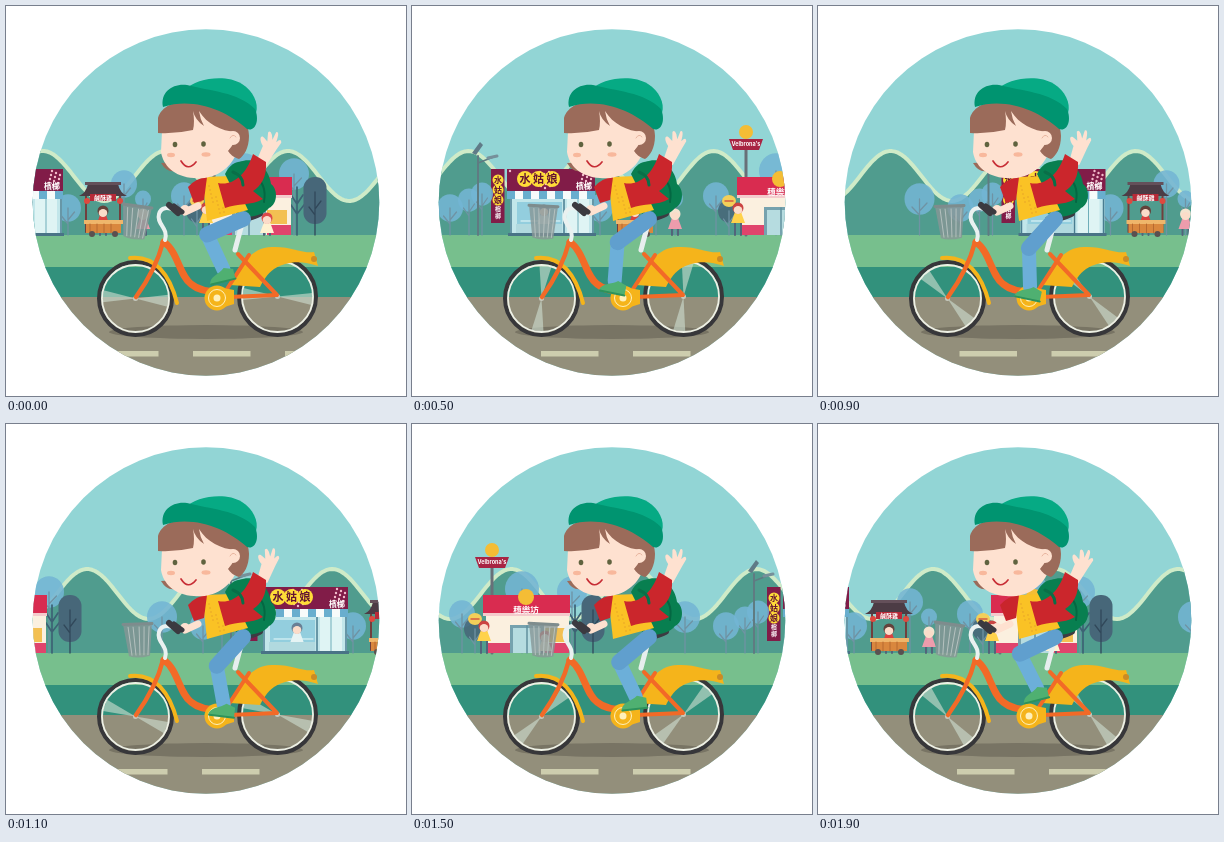
Recreate the animation shown at these times as an HTML page with a canvas. Size 400 by 390 pixels, loop 2000 ms.

```html
<!DOCTYPE html>
<html>
<head>
<meta charset="utf-8">
<style>
html, body { margin: 0; width: 100%; height: 100%; overflow: hidden; background: #fff; }
canvas { display: block; }
</style>
</head>
<body>
<canvas id="stage" width="400" height="390"></canvas>
<script>
const ctx = document.getElementById('stage').getContext('2d');
const CJK = '"Noto Sans CJK TC", "Noto Sans CJK", sans-serif';
const SKIN = '#fee1d0', HAIR = '#9b6b5a', ORANGE = '#f26a27', YELLOW = '#f5b41b';
const WORLD = 530, DASH = 92, HILL = 122.5;

// Poses at chosen steps of 100 ms, linear in between
const STEPS = [0, 3, 5, 7, 11, 15, 19];
const TRAVEL = [0, 76, 126, 176, 285, 402, 504];
const WHEEL = [-4, 45, 83, 107, 160, 225, 310];
const PEDAL = [-25, 60, 110, 145, 205, 262, 325];

function pose(values, step) {
  let i = 0;
  while (i < STEPS.length - 2 && step > STEPS[i + 1]) i++;
  const k = (step - STEPS[i]) / (STEPS[i + 1] - STEPS[i]);
  return values[i] + k * (values[i + 1] - values[i]);
}

function rect(x, y, w, h, color) {
  ctx.fillStyle = color;
  ctx.fillRect(x, y, w, h);
}
function oval(x, y, rx, ry, color) {
  ctx.fillStyle = color;
  ctx.beginPath();
  ctx.ellipse(x, y, rx, ry, 0, 0, 7);
  ctx.fill();
}
function disc(x, y, r, color) { oval(x, y, r, r, color); }
function ring(x, y, r, width, color) {
  ctx.strokeStyle = color;
  ctx.lineWidth = width;
  ctx.beginPath();
  ctx.arc(x, y, r, 0, 7);
  ctx.stroke();
}
function shape(d, color) {
  ctx.fillStyle = color;
  ctx.fill(new Path2D(d));
}
function line(d, width, color) {
  ctx.strokeStyle = color;
  ctx.lineWidth = width;
  ctx.lineCap = ctx.lineJoin = 'round';
  ctx.stroke(new Path2D(d));
}
function label(text, x, y, size, color, font = CJK) {
  ctx.fillStyle = color;
  ctx.font = `bold ${size}px ${font}`;
  ctx.textAlign = 'center';
  ctx.textBaseline = 'middle';
  ctx.fillText(text, x, y);
}
function turned(x, y, degrees, draw) {
  ctx.save();
  ctx.translate(x, y);
  ctx.rotate(degrees * Math.PI / 180);
  draw();
  ctx.restore();
}

function hills(travel) {
  const peak = 37 + travel * 0.155;
  let d = '';
  for (let x = 20; x <= 380; x += 3) {
    const y = 170 - 25 * Math.cos((x - peak) / HILL * 2 * Math.PI);
    d += (d ? 'L' : 'M') + x + ' ' + y.toFixed(1);
  }
  shape(d + 'L380 230 L20 230Z', '#509c8e');
  line(d, 4, '#cfebc8');
}

function tree(x, y, r, color = '#74b5d4') {
  const bark = '#6f93a4';
  ctx.globalAlpha = 0.88;
  oval(x, y, r, r * 1.05, color);
  ctx.globalAlpha = 1;
  line(`M${x} ${y} V229 M${x} ${y + 12} l${r / 2} -8 M${x} ${y + 16} l${-r / 2} -8`, 1.3, bark);
}
function slateTree(x) {
  ctx.fillStyle = '#476779';
  ctx.beginPath();
  ctx.roundRect(x - 11.5, 171, 23, 47, 11);
  ctx.fill();
  line(`M${x} 186 V229 M${x} 203 l6 -8 M${x} 209 l-6 -8`, 1.3, '#31485a');
}
function bareTree(x) {
  line(`M${x} 181 V229 M${x} 198 l6 -9 M${x} 198 l-6 -9 M${x} 208 l7 -9 M${x} 208 l-6 -9`, 1.7, '#3d6274');
}
function lamp(x) {
  line(`M${x} 150 V229`, 2, '#5f7b82');
  line(`M${x} 157 L${x + 18} 150`, 1.5, '#5f7b82');
  line(`M${x + 10} 152 l9 -2`, 3, '#76909a');
  shape(`M${x - 6} 147 L${x + 2} 136 L${x + 5} 139 L${x - 2} 149Z`, '#607b87');
}
function villager(x, y, hair, dress) {
  line(`M${x - 3} ${y + 10} V229 M${x + 3} ${y + 10} V229`, 2, '#52647a');
  shape(`M${x - 3} ${y + 3} h6 l4 11 h-14Z`, dress);
  disc(x, y - 1, 5.5, hair);
  oval(x, y + 1, 4.3, 4, '#fbdcc9');
}

function betelShop(x) {
  rect(x + 3, 184, 84, 45, '#c2e6ea');
  rect(x + 10, 196, 45, 30, '#93cede');
  rect(x + 60, 193, 22, 35, '#dff4f4');
  line(`M${x + 71} 193 V228`, 1, '#6eadb9');
  line(`M${x + 14} 215 H${x + 53}`, 1, '#e9fafa');
  villager(x + 37, 205, '#697f95', '#e6f4f4');
  rect(x + 9, 218, 46, 9, '#b1d9df');
  line(`M${x + 4} 184 V229 M${x + 57} 193 V229 M${x + 86} 184 V229`, 1.5, '#497d91');
  rect(x + 1, 227, 88, 3, '#497386');
  for (let i = 0; i < 11; i++) {
    rect(x + i * 8, 184, 8, 9, i % 2 ? '#f7fbfa' : '#69aece');
  }
  rect(x, 163, 88, 22, '#811c48');
  for (let i = 0; i < 26; i++) {
    disc(x + 3 + i * 41 % 83, 165 + i * 11 % 18, 1.2, '#f3bccb');
  }
  [...'水姑娘'].forEach((char, i) => {
    disc(x + 18 + i * 13.5, 173, 8, '#ffdc38');
    label(char, x + 18 + i * 13.5, 172.5, 11, '#631332');
  });
  label('檳榔', x + 77, 180, 8, '#fff');

  rect(x - 16, 163, 13.5, 54, '#811c48');
  [...'水姑娘'].forEach((char, i) => {
    disc(x - 9, 174 + i * 10, 5.5, '#ffdc38');
    label(char, x - 9, 174 + i * 10, 8, '#631332');
  });
  label('檳', x - 9, 203, 6, '#fff');
  label('榔', x - 9, 210, 6, '#fff');
}

function foodCart(x) {
  line(`M${x + 7} 190 V226 M${x + 41} 190 V226`, 2, '#713f3d');
  shape(`M${x} 190 Q${x + 7} 187 ${x + 9} 178 H${x + 39} Q${x + 41} 187 ${x + 48} 190Z`, '#4c3c45');
  rect(x + 6, 176, 36, 3, '#64505a');
  rect(x + 11, 188, 26, 7, '#b82a38');
  label('鹹酥雞', x + 24, 191.5, 6, '#fff');
  disc(x + 8, 195, 3, '#df493f');
  disc(x + 41, 195, 3, '#df493f');
  villager(x + 24, 206, '#63423b', '#db423f');
  rect(x + 5, 214, 39, 4, '#efb66b');
  rect(x + 7, 218, 35, 9, '#d9873e');
  line(`M${x + 11} 218 V227 M${x + 18} 218 V227 M${x + 25} 218 V227 M${x + 32} 218 V227`, 0.8, '#ae632e');
  disc(x + 13, 228, 3, '#5a5050');
  disc(x + 36, 228, 3, '#5a5050');
}

function burgerShop(x) {
  line(`M${x + 9} 142 V229`, 3, '#687078');
  shape(`M${x - 8} 133 H${x + 26} L${x + 22} 144 H${x - 4}Z`, '#a82443');
  label("Velbrona's", x + 9, 138.5, 5.5, '#fff', 'Inter, sans-serif');
  disc(x + 9, 126, 7, '#f4bd35');

  rect(x + 3, 190, 83, 39, '#fbf0df');
  rect(x, 171, 87, 20, '#d92c50');
  rect(x, 189, 87, 3, '#f4cbcc');
  disc(x + 43, 173, 8, '#f4bd35');
  label('穗樂坊', x + 43, 186, 8.5, '#fff');
  rect(x + 27, 201, 34, 28, '#76a2ae');
  rect(x + 30, 204, 28, 25, '#b6dce0');
  line(`M${x + 44} 202 V229`, 1.5, '#60909e');
  rect(x + 3, 219, 24, 10, '#e0446c');
  rect(x + 62, 204, 20, 14, '#f3c052');
  rect(x + 62, 219, 24, 10, '#e0446c');
  villager(x + 62, 213, '#dc4a49', '#fff2d1');
  villager(x + 1, 203, '#cb4442', '#ffd24b');
}

function scenery(x) {
  ctx.save();
  ctx.translate(x, 0);
  for (const [tx, ty, r] of [[62, 202, 13], [118, 178, 13], [137, 193, 8], [178, 190, 13],
    [238, 165, 17], [288, 168, 15], [401, 193, 15], [442, 202, 13], [461, 194, 11], [474, 188, 11]]) {
    tree(tx, ty, r);
  }
  bareTree(291);
  slateTree(309);
  tree(191, 205, 11, '#476779');
  lamp(470);
  oval(191, 195, 7, 6, '#f3cf59');
  line('M187 195 h8', 1.5, '#d55b43');
  burgerShop(199);
  foodCart(73);
  villager(137, 209, '#f3e3cf', '#ed9cac');
  betelShop(-31);
  ctx.restore();
}

function wheel(x, y, r, degrees) {
  turned(x, y, -degrees, () => {
    for (const side of [-1, 1]) {
      shape(`M0 0 L${side * (r - 6)} -6 L${side * (r - 6)} 6Z`, 'rgba(205,222,207,.62)');
    }
  });
  ring(x, y, r - 2, 4, '#37373a');
  ring(x, y, r - 5, 1.8, '#edf0e5');
  disc(x, y, 2.5, '#c6c9bd');
}

function basket(tilt) {
  turned(132, 200, tilt, () => {
    shape('M-15 0 H14 L11 32 Q-1 35 -10 32Z', 'rgba(135,151,151,.8)');
    line('M-15 0 H14', 3, '#7e8c8d');
    line('M-10 3 L-7 31 M-5 3 L-3 31 M1 3 L1 31 M6 3 L5 31 M11 3 L9 31', 0.9, '#b9c4c2');
  });
}

function bike(degrees, tilt) {
  oval(200, 326, 97, 7, '#787464');
  wheel(129.5, 292.5, 38.5, degrees);
  wheel(271.5, 290.5, 40.5, degrees);
  basket(tilt);
  line('M124 252 C149 249 164 269 171 297', 4, YELLOW);
  shape('M224 279 C234 262 244 241 266 241 C285 240 297 248 308 246 L312 260 C296 254 280 255 268 263 C261 268 257 275 254 281Z', YELLOW);
  disc(308, 253, 3, '#cb8b25');
  line('M237 214 L229 244', 5, '#e7eeee');
  line('M243 249 L221 283', 4, ORANGE);
  line('M232 248 L271 289 L223 291', 4, ORANGE);
  line('M157 236 C153 252 145 270 130 291', 4.5, ORANGE);
  line('M158 236 C172 246 173 269 185 278 C192 284 202 286 214 286', 7, ORANGE);
  line('M159 234 C163 222 150 218 153 208 C155 201 162 201 168 204', 4, '#eaf1f0');
  line('M163 199 L172 207', 6, '#3b3a40');
  line('M231 214 C239 211 246 211 253 207', 8, '#3c3b42');
  shape('M212 281 L228 284 V298 L212 303Z', YELLOW);
  disc(211, 292, 12.5, YELLOW);
  ring(211, 292, 8.5, 1, '#fff0ba');
  disc(211, 292, 3.5, '#fff0ba');
}

function leg(degrees) {
  const a = degrees * Math.PI / 180;
  const footX = 211 - 11 * Math.sin(a), footY = 279 - 9 * Math.cos(a);
  const hip = [237, 213], ankle = [footX + 2, footY - 7];
  const dx = ankle[0] - hip[0], dy = ankle[1] - hip[1], reach = Math.hypot(dx, dy);
  const bend = Math.sqrt(Math.max(0, 39 * 39 - reach * reach / 4));
  const kneeX = (hip[0] + ankle[0]) / 2 - dy / reach * bend;
  const kneeY = (hip[1] + ankle[1]) / 2 + dx / reach * bend;
  line(`M${kneeX} ${kneeY} L${ankle}`, 14, '#6cafd9');
  line(`M${hip} L${kneeX} ${kneeY}`, 16, '#609fce');
  turned(footX, footY, -14 * Math.sin(a + 2.2), () => {
    shape('M-13 5 C-12 -3 -2 -3 4 -8 L13 -5 V5Z', '#4fb071');
    line('M-12 5 H13', 2, '#2d925b');
  });
}

function torso(wave) {
  turned(256, 150, wave, () => {
    shape('M-6 8 L0 -10 C-5 -17 -3 -22 1 -18 L4 -15 L4 -24 Q6 -27 8 -22 L9 -17 L12 -25 Q15 -26 14 -20 L13 -15 Q18 -20 18 -15 L14 -8 L5 9Z', SKIN);
  });
  shape('M196 171 L226 170 L242 204 Q222 209 201 215Z', '#fac225');
  for (let i = 0; i < 14; i++) {
    disc(203 + i * 7 % 20, 180 + i * 11 % 29, 0.7, '#e19b28');
  }
  line('M192 200 L179 206', 7, SKIN);
  disc(179, 204, 5, SKIN);
  line('M168 200 L176 206', 5, '#3b3a40');
  shape('M182 181 Q190 172 201 171 L198 194 L188 197Z', '#c9252c');
  shape('M219 168 C227 152 240 154 245 160 L240 176 L226 182Z', '#087f50');
  shape('M212 177 C226 180 240 170 247 148 L260 156 C261 171 255 180 247 185 L257 193 C245 200 232 197 219 202Z', '#cb262c');
  line('M227 166 Q237 170 237 179', 3, '#096f48');
}

function head() {
  shape('M155 157 Q166 155 169 165 Q161 167 155 157Z', HAIR);
  shape('M156 125 C157 107 180 98 202 102 C227 106 237 127 230 148 C223 166 204 174 188 172 C168 171 157 159 155 146Z', SKIN);
  shape('M152 127 V112 C157 95 184 90 214 99 C236 105 243 118 243 130 C243 142 238 150 233 153 C227 151 224 148 222 145 C227 139 230 134 230 126 C215 125 201 118 193 105 Q194 113 198 120 Q189 114 187 105 Q189 116 187 124 Q170 128 152 127Z', HAIR);
  disc(227, 132, 7, SKIN);
  line('M224 132 q3 -5 6 -1', 1, '#e7b59f');
  oval(169, 138.5, 2.3, 2.7, '#60633f');
  oval(197.5, 138, 2.3, 2.7, '#60633f');
  oval(165, 149, 4, 2.2, '#f8b89c');
  oval(200, 148.5, 4.5, 2.2, '#f8b89c');
  line('M175 155 Q182 166 190 156', 1.7, '#c72d35');
}

function hat() {
  shape('M179 84 C190 72 220 68 236 78 C247 85 253 97 250 107 L239 112Z', '#06aa84');
  shape('M157 101 C154 86 167 77 181 79 C204 85 232 86 249 103 C254 115 249 126 241 123 C220 104 187 91 157 101Z', '#009470');
}

function rider(pedal, wave) {
  shape('M226 162 C242 145 263 159 265 178 C272 183 272 198 263 202 C255 212 234 214 226 204Z', '#087f50');
  line('M248 171 C257 175 260 184 258 196', 2, '#046742');
  leg(pedal);
  torso(wave);
  head();
  hat();
}

function draw(step) {
  const travel = pose(TRAVEL, step);
  const swing = Math.cos(step / 20 * 2 * Math.PI);
  ctx.clearRect(0, 0, 400, 390);
  ctx.save();
  ctx.beginPath();
  ctx.arc(200, 196.5, 173.3, 0, 7);
  ctx.clip();
  rect(0, 0, 400, 390, '#92d5d5');
  hills(travel);
  rect(0, 229, 400, 33, '#77bf8d');
  scenery(travel);
  scenery(travel - WORLD);
  rect(0, 261, 400, 31, '#32917c');
  rect(0, 291, 400, 100, '#938f7b');
  for (let x = (187 + travel) % DASH - DASH; x < 400; x += DASH) {
    rect(x, 345, 57.5, 5.5, '#cdcdae');
  }
  bike(pose(WHEEL, step), 3 + 5 * swing);
  rider(pose(PEDAL, step), 1 + 4 * swing);
  ctx.restore();
}

function frame() {
  draw(Math.floor(performance.now() % 2000 / 100));
  requestAnimationFrame(frame);
}
frame();
</script>
</body>
</html>
```
